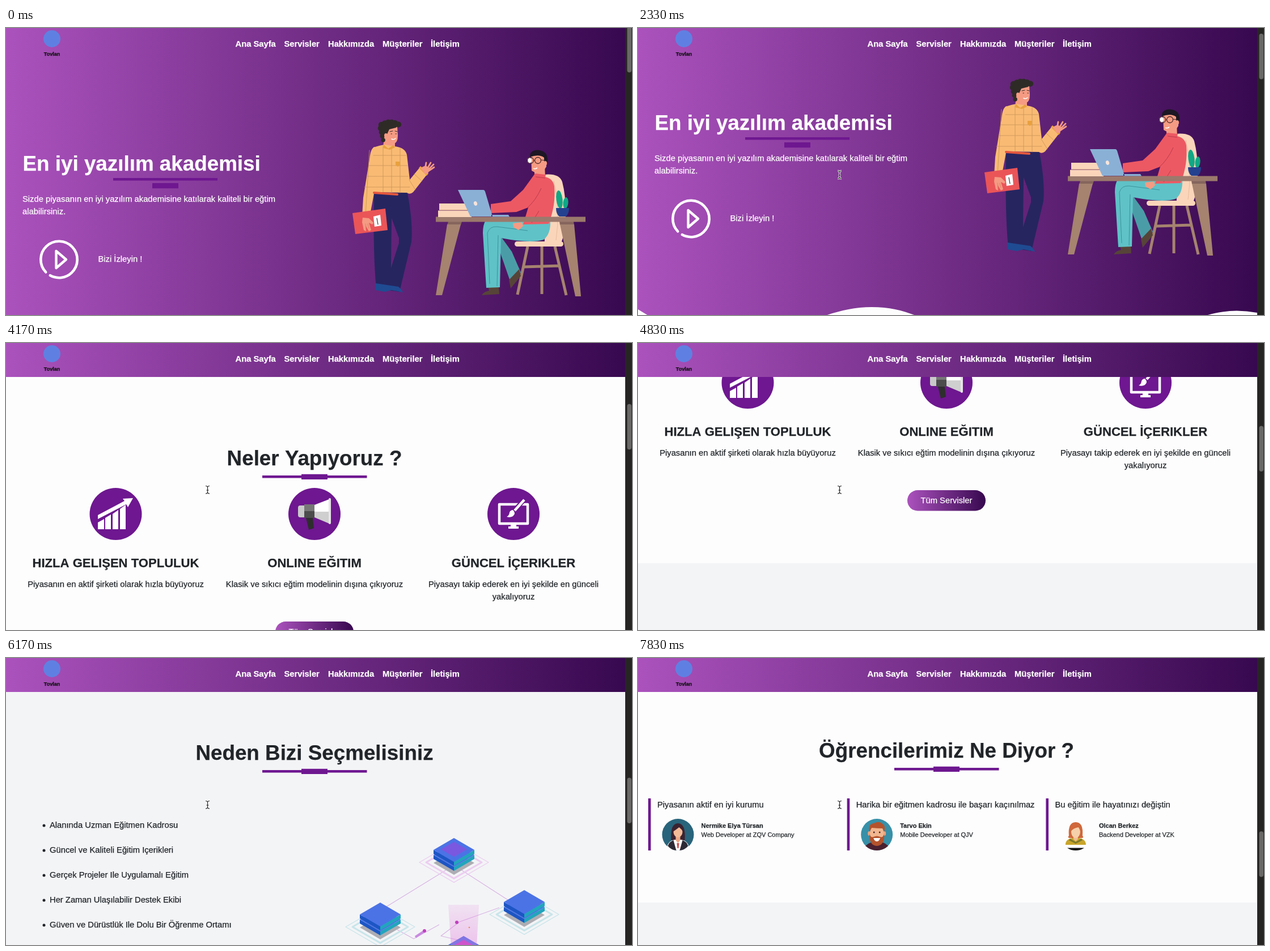
An HTML page with a canvas for the animation above (8000 ms loop, 1104 px wide and 507 px high).

```html
<!DOCTYPE html>
<html lang="tr">
<head>
<meta charset="utf-8">
<style>
  html, body { margin: 0; width: 100%; height: 100%; overflow: hidden; background: #fdfdfd; }
  canvas { display: block; }
</style>
</head>
<body>
<canvas id="stage" width="1104" height="507"></canvas>
<script>
const ctx = document.getElementById('stage').getContext('2d');
const W = 1092, H = 507, LOOP = 8000, FPS = 6;
const PURPLE = '#6e1790', INK = '#212529', WHITE = '#fdfdfd', GRAY = '#f3f4f6';
const SKIN = '#f59b83', WOOD = '#a5836f', CREAM = '#fbd5ba', TEAL = '#5fc2c7';

// Scroll positions as [tick, page offset]; the page rests where two in a row are equal.
const KEYS = [[6, 0], [14, 72], [20, 294], [25, 655], [32, 971], [33, 971], [35, 1173],
  [36, 1173], [38, 1375], [39, 1375], [42, 1679], [43, 1679], [47, 1840]];

const slope = i => i < 0 || i > KEYS.length - 2 ? 0
  : (KEYS[i + 1][1] - KEYS[i][1]) / (KEYS[i + 1][0] - KEYS[i][0]);
const tangent = i => {
  const a = slope(i - 1), b = slope(i);
  return a * b ? 2 * a * b / (a + b) : 0;
};
function scrollAt(tick) {
  if (tick <= KEYS[0][0]) return 0;
  const i = KEYS.findIndex((k, j) => j < KEYS.length - 1 && tick <= KEYS[j + 1][0]);
  const [t0, y0] = KEYS[i], [t1, y1] = KEYS[i + 1], d = t1 - t0, u = (tick - t0) / d;
  const ease = u * u * (3 - 2 * u);
  return Math.round(y0 + (y1 - y0) * ease + d * u * (1 - u) * ((1 - u) * tangent(i) - u * tangent(i + 1)));
}

function fill(color, d) {
  ctx.fillStyle = color;
  ctx.fill(new Path2D(d), 'evenodd');
}
function line(color, width, d) {
  ctx.strokeStyle = color;
  ctx.lineWidth = width;
  ctx.stroke(new Path2D(d));
}
function rect(color, x, y, w, h, r = 0) {
  ctx.fillStyle = color;
  ctx.beginPath();
  ctx.roundRect(x, y, w, h, r);
  ctx.fill();
}
function oval(color, x, y, rx, ry = rx, turn = 0) {
  ctx.fillStyle = color;
  ctx.beginPath();
  ctx.ellipse(x, y, rx, ry, turn, 0, 7);
  ctx.fill();
}
// The hairline stroke gives the slightly heavier look of smoothed text.
function text(s, x, y, size = 14.76, color = INK, weight = 400, align = 'left') {
  ctx.font = `${weight} ${size}px "Liberation Sans", Arial, sans-serif`;
  ctx.textAlign = align;
  ctx.fillStyle = ctx.strokeStyle = color;
  ctx.lineWidth = .25;
  ctx.fillText(s, x, y);
  ctx.strokeText(s, x, y);
}
function brand(x0, x1) {
  const g = ctx.createLinearGradient(x0, 0, x1, 0);
  g.addColorStop(0, '#ab52bd');
  g.addColorStop(1, '#37084f');
  return g;
}
function heading(s, y) {
  text(s, 544, y, 36.8, INK, 700, 'center');
  rect(PURPLE, 452, y + 18, 184.5, 4.6);
  rect(PURPLE, 521, y + 15.8, 46, 9.2);
}

function standingMan() {
  fill('#262560', 'M649 291L708 291Q718 345 715 378L694 466 653 460Q647 400 649 291Z M680 336L693 371 693 380 679 424Z');
  fill('#1f4b92', 'M652 451L692 457Q698 462 700 467L680 463 668 466 652 463Z');
  fill(SKIN, 'M667 190L686 194 686 212 665 212Z');
  fill(SKIN, 'M668 176L690 174 691 190Q691 203 684 204 674 203 667 194Z');
  for (let i = 0; i < 6; i++) oval('#2e2b27', 662 + i * 6, 171 - 4.5 * Math.sin(i * .6), 5.2);
  for (let i = 0; i < 4; i++) oval('#2e2b27', 661 + i * 1.4, 177 + i * 7, 5.2 - i * .5);
  fill('#2e2b27', 'M660 170L692 170 688 176 676 179 671 190 662 192Z');
  oval(SKIN, 670, 190, 3, 4);
  line('#2e2b27', 1, 'M677 183l5 -1M686 182l4 1M679 187h1.5M687 187h1.500');
  line('#fff', 1.6, 'M680 196q4 2 7 -1');
  fill('#f9bb74', 'M648 211Q660 207 668 206L685 209Q704 211 707 224L712 268 730 246 743 258 718 290Q712 295 707 291L649 290Z');
  fill('#f9bb74', 'M650 210Q643 212 641 232L630 300 628 333 641 335 648 298 657 245Z');
  line('#c79356', .8, 'M665 209V290M680 210V291M695 212V291M648 225H706M640 243H708M636 262H709M632 281H712M641 216L634 332M711 268L722 286M720 258L733 270');
  fill('#e9a13f', 'M687 236h8v6l-4 3 -4 -3ZM666 206l8 7 9 -6 3 4 -9 4 -12 -3ZM728 247l3 -3 14 13 -3 4ZM628 330l14 2v5l-15 -2Z');
  line('#e5573d', 4, 'M649 291L690 294');
  line(SKIN, 2.8, 'M739 250L741 238M742 250L749 238M743 252L754 241M743 254L755 246');
  fill(SKIN, 'M731 247L740 243 748 248 744 257 739 258Z');
  fill('#ea5558', 'M611 327L669 319 673 357 616 364Z');
  fill('#fff', 'M648 333L660 330 662 349 650 351Z');
  line('#333', 1.2, 'M654 336l2 11');
  fill(SKIN, 'M629 335L640 336 648 344 646 347 640 344 644 357 640 359 634 349 635 359 631 357 628 343Z');
  line('#d8795f', .8, 'M634 346l1 8M638 346l2 8');
}

function deskScene() {
  line(WOOD, 5, 'M920 386L902 471M945 386V470M968 386L988 472M914 422L976 420');
  fill(CREAM, 'M948 259Q976 256 981 272 987 295 987 325 987 362 978 382L950 384Z');
  rect(CREAM, 897, 377, 86, 9, 5);
  line('#e0b495', .8, 'M966 270Q978 320 970 375');
  fill('#4a9da7', 'M871 366L892 395 908 432 889 447 870 392Z');
  fill('#574438', 'M905 426L908 438 890 460 887 445Z M850 457L869 457 870 470 839 472Q842 466 852 464Z');
  fill(TEAL, 'M846 340L960 340Q961 364 948 374 925 381 873 371L871 458 847 459 841 362Q841 347 846 340Z');
  line('#3a929a', 1, 'M853 452L849 362Q853 350 866 351L920 358M866 456L868 366');
  fill(SKIN, 'M932 245L950 242 951 264 932 266Z');
  fill(SKIN, 'M926 226Q938 219 952 226L953 245Q947 256 936 257L927 252Z');
  fill('#1d1724', 'M924 228Q923 216 938 215.5 957 217 955 237L949 239 949 229Q940 222 924 228Z');
  oval('#fff', 923, 234, 4, 5);
  ctx.strokeStyle = '#4b2a2b';
  ctx.lineWidth = 1.3;
  for (const x of [925, 938]) {
    ctx.beginPath();
    ctx.arc(x, 234, 5.5, 0, 7);
    ctx.stroke();
  }
  line('#4b2a2b', 1.2, 'M943 233L952 234M931 234h2');
  line('#fff', 1.6, 'M930 248q3 2 7 -1');
  oval(SKIN, 951, 239, 3, 4);
  fill('#ed5963', 'M933 257L952 259 951 263Q965 266 967 280 970 312 957 346L912 347 921 317 900 325 855 327 855 311 890 306 912 286Z');
  line('#b93c4d', 1, 'M944 283Q934 305 919 318M934 263l17 2M940 323L927 344');
  fill(SKIN, 'M894 345L910 343 912 350 904 357 895 352Z');
  fill('#86655d', 'M780 342H804L802 348H778ZM976 342H1001L1002 348H977Z');
  fill(WOOD, 'M778 347H802L769 472H758ZM977 347H1002L1014 474H1004Z');
  rect('#9b796c', 758, 333.5, 264, 9);
  fill(CREAM, 'M764 310H819V321H764ZM762 322.5H821V334H762Z');
  line('#d5a486', 1, 'M764 321.5H820');
  fill('#8ab0d6', 'M797 286H842Q844 286 845 289L858 333H819ZM856 330H886L888 333.5H856Z');
  oval('#f7e3da', 828, 310, 3, 4, -.3);
  oval('#10a885', 976, 303, 5.5, 16, -.12);
  oval('#10a885', 987, 309, 4.5, 10, .1);
  fill('#24418f', 'M970 318H993Q993 329 987 333H976Q970 329 970 318Z');
}

function hero() {
  rect(brand(0, W), 0, 0, W, 700);
  fill(WHITE, 'M0 569C60 607 120 627 178 627C255 627 320 565 412 565C455 565 485 577 510 589C590 627 670 650 757 650C810 650 855 639 890 624C950 598 1005 571.5 1056 571.5Q1074 571.5 1092 575V701H0Z');
  text('En iyi yazılım akademisi', 29.5, 252, 36.8, '#fff', 700);
  rect(PURPLE, 189, 265, 184, 4.6);
  rect(PURPLE, 258, 274, 46, 9.2);
  text('Sizde piyasanın en iyi yazılım akademisine katılarak kaliteli bir eğtim', 29, 307, 14.76, '#fff');
  text('alabilirsiniz.', 29, 329, 14.76, '#fff');
  ctx.lineCap = ctx.lineJoin = 'round';
  ctx.strokeStyle = '#fff';
  ctx.lineWidth = 4.6;
  ctx.beginPath();
  ctx.arc(93.5, 409, 32.2, 2.38, 2.08 + 2 * Math.PI);
  ctx.stroke();
  line('#fff', 4.4, 'M88.5 394V424L106 409Z');
  text('Bizi İzleyin !', 162.5, 413, 14.76, '#fff');
  standingMan();
  ctx.lineCap = 'butt';
  deskScene();
}

function services() {
  heading('Neler Yapıyoruz ?', 871);
  const cards = [
    [193.5, 'HIZLA GELIŞEN TOPLULUK', 'Piyasanın en aktif şirketi olarak hızla büyüyoruz'],
    [544, 'ONLINE EĞITIM', 'Klasik ve sıkıcı eğtim modelinin dışına çıkıyoruz'],
    [895, 'GÜNCEL İÇERIKLER', 'Piyasayı takip ederek en iyi şekilde en günceli', 'yakalıyoruz']];
  for (const [x, title, ...lines] of cards) {
    oval(PURPLE, x, 957, 46);
    text(title, x, 1051, 22.08, INK, 700, 'center');
    lines.forEach((s, i) => text(s, x, 1086 + i * 22, 14.76, INK, 400, 'center'));
  }
  ctx.save();
  ctx.translate(0, 655);
  fill('#fff', 'M162 329V317L173 311V329ZM175 329V309L185 303V329ZM188 329V302L198 295V329ZM201 329V293L211 286V329Z');
  fill('#fff', 'M162 311V304L209 279 206 275 224 274 215 290 212 285Z');
  rect('#c9c9c9', 515, 287, 14, 21, 4);
  rect('#777', 526, 285, 18, 12);
  rect('#4c4c4c', 526, 297, 18, 12);
  fill('#fff', 'M544 286L570 276V298H544Z');
  fill('#cfcfcf', 'M544 298H570V319L544 308Z');
  rect('#e5e5e5', 569, 274, 4, 46, 2);
  fill('#2e2e2e', 'M529 309H541L543 327 534 330Z');
  ctx.strokeStyle = '#fff';
  ctx.lineWidth = 4.5;
  ctx.strokeRect(870, 285, 50, 34);
  fill('#fff', 'M890 320H900V324H904V328H886V324H890Z');
  line(PURPLE, 8, 'M915 276L894 298');
  line('#fff', 4.5, 'M914 277L897 296');
  fill('#fff', 'M894 295Q900 301 894 306 889 309 883 307 888 304 888 299 890 295 894 295Z');
  ctx.restore();
  rect(brand(475, 613), 475, 1147, 138, 36.5, 18.2);
  text('Tüm Servisler', 544, 1170, 14.76, '#fff', 400, 'center');
}

const diamond = (x, y, r) => `M${x} ${y - r * .58}L${x + r} ${y} ${x} ${y + r * .58} ${x - r} ${y}Z`;
function server(x, y, ring, top) {
  line(ring, 1.3, diamond(x, y, 61));
  line(ring, 3, diamond(x, y, 49));
  fill('#adadb3', diamond(x, y + 1, 36));
  for (const lift of [13, 22]) {
    fill('#1d56c4', `M${x - 36} ${y - lift}L${x} ${y - lift + 21}V${y - lift + 28}L${x - 36} ${y - lift + 7}Z`);
    fill('#22a5bd', `M${x + 36} ${y - lift}L${x} ${y - lift + 21}V${y - lift + 28}L${x + 36} ${y - lift + 7}Z`);
    fill('#4b73e6', diamond(x, y - lift, 36));
  }
  fill(top, diamond(x, y - 23, 23));
}

function reasons() {
  rect(GRAY, 0, 1276, W, 608);
  heading('Neden Bizi Seçmelisiniz', 1454);
  const items = ['Alanında Uzman Eğitmen Kadrosu', 'Güncel ve Kaliteli Eğitim Içerikleri',
    'Gerçek Projeler Ile Uygulamalı Eğitim', 'Her Zaman Ulaşılabilir Destek Ekibi',
    'Güven ve Dürüstlük Ile Dolu Bir Öğrenme Ortamı'];
  items.forEach((s, i) => {
    const y = 1750 - (items.length - 1 - i) * 44;
    oval(INK, 67, y - 4, 2.5);
    text(s, 77, y);
  });
  ctx.save();
  ctx.beginPath();
  ctx.rect(590, 1500, 400, 333);
  ctx.clip();
  line('#d9b3e4', 1.2, 'M690 1754L719 1770 764 1745M830 1780L767 1765 800 1740 870 1715M660 1720L790 1640 914 1720');
  server(790, 1635, '#eccdf0', '#7a58e0');
  server(660, 1749, '#c8e5ea', '#4b73e6');
  server(914, 1727, '#c8e5ea', '#4b73e6');
  server(807, 1808, '#eac8ee', '#c23fc0');
  const beam = ctx.createLinearGradient(0, 1710, 0, 1785);
  beam.addColorStop(0, 'rgba(226,120,220,.15)');
  beam.addColorStop(1, 'rgba(226,120,220,.4)');
  fill(beam, 'M780 1710H834L830 1785 807 1798 785 1785Z');
  line('#c98ae0', 4, 'M722 1767L737 1757');
  oval('#c23fc0', 738, 1756, 3);
  oval('#c23fc0', 795, 1741, 3);
  oval('#f08a55', 817, 1750, 1.3);
  ctx.restore();
}

const AVATARS = [
  () => {
    oval('#28647b', 0, 0, 28);
    fill('#3b2331', 'M-12 10Q-14 -20 0 -20 14 -20 12 10Z');
    fill('#fff', 'M-19 21Q-17 11 -6 9H6Q17 11 19 21 10 28 0 28 -10 28 -19 21Z');
    fill('#2c2a35', 'M-18 20Q-15 12 -8 10L-3 28Q-12 27 -18 20ZM18 20Q15 12 8 10L3 28Q12 27 18 20Z');
    fill('#eda987', 'M-4 2H4V10L0 15 -4 10Z');
    oval('#f4bb98', 0, -5, 8, 10);
    fill('#3b2331', 'M-9 -5Q-9 -17 0 -17 9 -17 9 -5 6 -10 2 -13 -3 -9 -9 -5Z');
    fill('#c94f4f', 'M-2 15L2 15 1 24 -1 24Z');
  },
  () => {
    oval('#3790a8', 0, 0, 28);
    fill('#4a2130', 'M-20 20Q-14 14 -6 13H6Q14 14 20 20 11 28 0 28 -11 28 -20 20Z');
    oval('#eba47e', -13, -2, 3, 4);
    oval('#eba47e', 13, -2, 3, 4);
    oval('#f2b78f', 0, -3, 12, 15);
    fill('#b4532c', 'M-13 -1Q-11 6 -6 4 0 1 6 4 11 6 13 -1 14 19 0 20 -14 19 -13 -1Z');
    fill('#b4532c', 'M-13 -5Q-16 -19 -5 -20 4 -25 10 -19 16 -16 13 -5L10 -11Q0 -11 -9 -12Z');
    oval('#3d2430', -5, -4, 1.4);
    oval('#3d2430', 5, -4, 1.4);
    fill('#fff', 'M-6 6H6Q4 12 0 12 -4 12 -6 6Z');
  },
  () => {
    fill('#d0683b', 'M-12 2Q-14 -22 0 -22 14 -22 12 2Q15 5 11 6H-11Q-15 5 -12 2Z');
    fill('#c8a52b', 'M-18 18Q-18 8 -6 6H6Q18 8 18 18Z');
    fill('#7d7a2c', 'M-10 7L0 13 10 7 12 10 0 16 -12 10Z');
    fill('#f0bd93', 'M-4 2H4V8L0 12 -4 8Z');
    oval('#f6d0aa', 0, -5, 8, 11);
    fill('#d0683b', 'M-9 -5Q-10 -19 0 -19 10 -19 9 -5L5 -13Q-4 -12 -9 -5Z');
    fill('#151515', 'M-15 23.5H15Q8 28 0 28 -8 28 -15 23.5Z');
  }];

function students() {
  rect(WHITE, 0, 1884, W, 388);
  rect(GRAY, 0, 2272, W, 200);
  heading('Öğrencilerimiz Ne Diyor ?', 2016);
  const cards = [
    ['Piyasanın aktif en iyi kurumu', 'Nermike Elya Türsan', 'Web Developer at ZQV Company'],
    ['Harika bir eğitmen kadrosu ile başarı kaçınılmaz', 'Tarvo Ekin', 'Mobile Deeveloper at QJV'],
    ['Bu eğitim ile hayatınızı değiştin', 'Olcan Berkez', 'Backend Developer at VZK']];
  cards.forEach(([quote, name, role], i) => {
    ctx.save();
    ctx.translate(i * 350.7, 0);
    rect(PURPLE, 18, 2088, 4.6, 92);
    text(quote, 34, 2104);
    text(name, 111.5, 2139.5, 11.04, INK, 700);
    text(role, 111.5, 2156, 11.04);
    ctx.translate(70.5, 2152);
    AVATARS[i]();
    ctx.restore();
  });
}

function navbar() {
  rect(brand(0, W), 0, 0, W, 60);
  oval('#5f80e2', 81, 19, 15);
  text('Tovlan', 81, 49, 9, '#111', 700, 'center');
  const links = [['Ana Sayfa', 404.5], ['Servisler', 490.5], ['Hakkımızda', 568], ['Müşteriler', 664], ['İletişim', 749]];
  for (const [s, x] of links) text(s, x, 33, 14.76, '#fff', 700);
}

function cursor() {
  const beam = 'M352 252.5Q355.5 252.5 355.5 255V263.5Q355.5 266 352 266M359 252.5Q355.5 252.5 355.5 255M359 266Q355.5 266 355.5 263.5M353.5 260H357.5';
  line('#fff', 3, beam);
  line('#222', 1.2, beam);
}

function draw(tick) {
  const top = scrollAt(tick);
  rect(WHITE, 0, 0, W, H);
  ctx.save();
  ctx.translate(0, -top);
  hero();
  services();
  reasons();
  students();
  ctx.restore();
  navbar();
  rect('#272524', W, 0, 12, H);
  rect('#6b6968', 1095.5, -2 + top * .1675, 7.5, 80.5, 3.7);
  if (tick >= 7) cursor();
}

const start = performance.now();
let shown = -1;
function frame() {
  const t = (performance.now() - start) % LOOP;
  const tick = Math.floor((t + 5) * FPS / 1000) % (LOOP * FPS / 1000);
  if (tick !== shown) draw(shown = tick);
  requestAnimationFrame(frame);
}
frame();
</script>
</body>
</html>
```
